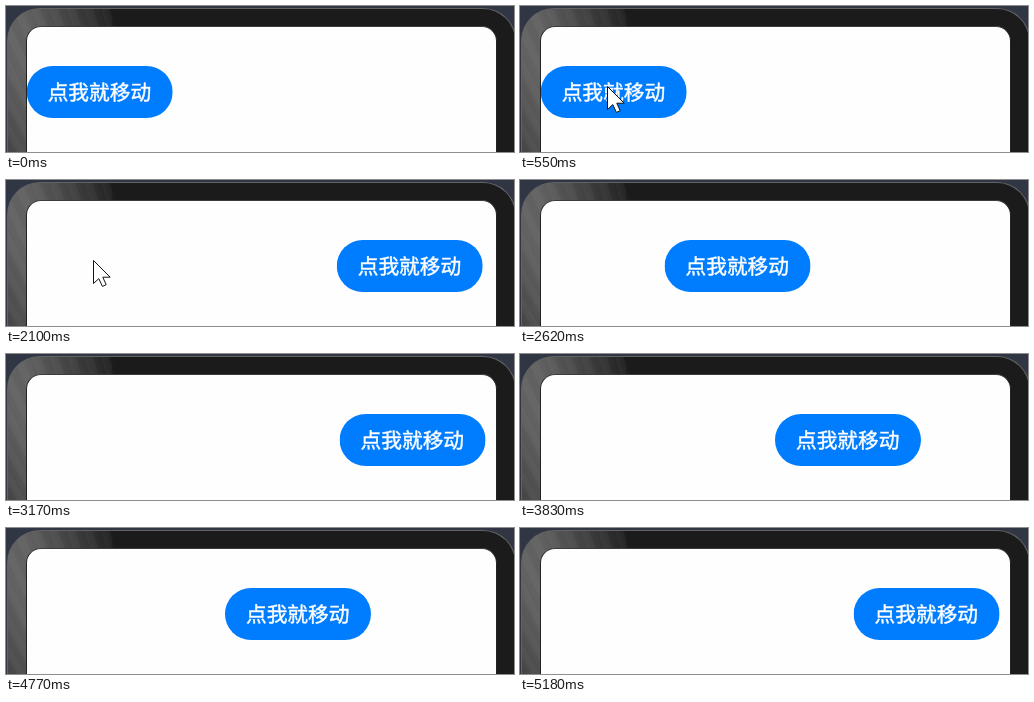
Recreate the animation shown at these times as an HTML page. Size 508 by 146 pixels, loop 5.77 s.

```html
<!DOCTYPE html>
<html lang="zh-CN">
<head>
<meta charset="utf-8">
<title>点我就移动</title>
<style>
  html, body { margin: 0; width: 100%; height: 100%; overflow: hidden; background: #303643; }

  #stage {
    --loop: 5770ms;
    --home: translateX(20.7px);
    --away: translateX(333.6px);
    position: relative; width: 508px; height: 146px; overflow: hidden;
  }
  #stage > * { position: absolute; box-sizing: border-box; }

  .bezel {
    left: 1px; top: 2px; width: 509px; height: 300px;
    border: 1px solid #626365; border-bottom: 0; border-radius: 33px 33px 0 0;
    background:
      repeating-conic-gradient(from 320deg at 254px 560px, #ffffff08 0 .8deg, #0000 .8deg 1.6deg) 0 0 / 104px 100% no-repeat,
      conic-gradient(at 254px 560px, #1b1b1b 0 322deg, #464646 329deg, #626262 334deg,
        #606060 337deg, #404040 341deg, #282828 344deg, #1b1b1b 345deg);
  }

  .screen {
    left: 20px; top: 20px; width: 471px; height: 300px;
    border: 1px solid #222; border-top-color: #3c3c3c; border-radius: 15px; background: #fefefe;
  }

  .button {
    left: 0; top: 59.8px; width: 146.4px; height: 52.4px; border-radius: 27px;
    background: #007dff; color: #fff; text-align: center; text-indent: -1px; white-space: nowrap;
    font: 500 20.7px/50.4px "Noto Sans CJK SC", "Noto Sans CJK", sans-serif;
    -webkit-text-stroke: .45px #fff;
    animation: run var(--loop) ease-in-out infinite;
  }

  .cursor {
    left: 0; top: 0; width: 20px; height: 29px; overflow: visible;
    animation: visit var(--loop) linear infinite;
  }

  /* Four runs to the right, each preceded by a hard jump home */
  @keyframes run {
    0%, 21.65% { transform: var(--home); }
    37.5%, 38% { transform: var(--away); }
    38.01% { transform: var(--home); }
    54.9%, 55.09% { transform: var(--away); }
    55.1% { transform: var(--home); }
    72.4%, 73.04% { transform: var(--away); }
    73.05% { transform: var(--home); }
    89.7%, 100% { transform: var(--away); }
  }

  @keyframes visit {
    0%, 3.6% { transform: translate(-20px, 106px); animation-timing-function: ease-out; }
    9.5%, 38.2% { transform: translate(87px, 80px); animation-timing-function: ease-in; }
    42.8%, 100% { transform: translate(-24px, 88px); }
  }
</style>
</head>
<body>
<div id="stage">
  <div class="bezel"></div>
  <div class="screen"></div>
  <div class="button">点我就移动</div>
  <svg class="cursor" viewBox="0 0 20 29">
    <path d="M.5 .5V23.5L5.8 18.6 9.4 26.4 13.2 24.7 9.8 17.2H17.2Z" fill="#fff" stroke="#111"/>
  </svg>
</div>
</body>
</html>
```
